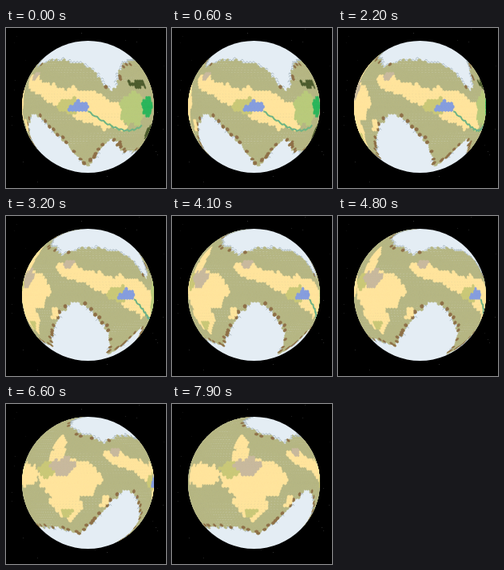
Animation of 200 by 200 pixels, one loop 8000 ms. Source, as an HTML page with a canvas:

```html
<!DOCTYPE html>
<html>
<head>
<meta charset="utf-8">
<style>
html, body { margin: 0; height: 100%; overflow: hidden; background: #000; }
canvas { display: block; width: 200px; height: 200px; }
</style>
</head>
<body>
<canvas id="stage" width="200" height="200"></canvas>
<script>
const ctx = document.getElementById('stage').getContext('2d');
const CX = 102.5, CY = 98.5, R = 82.5, RAD = Math.PI / 180;
const LOOP = 8000, STEP = 100, SPEED = 13.85; // degrees of longitude per second
const SEA = '#e4edf4', LAND = '#b5b684', SAND = '#ffe49c', BROWN = '#8f7048';
const ROCK = '#c8b99e', STEPPE = '#c9c878', MEADOW = '#b9ca7b';
const JUNGLE = '#2db55c', FOREST = '#4d5c2e', LAKE = '#869edd';

const hash = (a, b) => {
  const s = Math.sin(a * 127.1 + b * 311.7) * 43758.5453;
  return s - Math.floor(s);
};
const bump = (x, center, width) => Math.exp(-(((x - center) / width) ** 2));
const rough = (a, b) => Math.sin(a * .33 + b * .19) + Math.sin(a * .61 - b * .47 + 2) * .8;

// Coasts as latitudes over longitude: a base line with capes and bays
const northCoast = lon => 45 + 70 * bump(lon, -185, 48) - 8 * bump(lon, -72, 12)
  - 12 * bump(lon, 18, 30) - 20 * bump(lon, 22, 10);
const southCoast = lon => -42 + 36 * bump(lon, -54, 26) - 9 * bump(lon, -106, 14)
  - 22 * bump(lon, -3, 13) + 13 * bump(lon, 25, 10);

const isLand = (lon, lat) => {
  const y = lat + rough(lon, lat);
  return y < northCoast(lon) && y > southCoast(lon);
};

// A desert belt sloping across the continent, widest near the lake
const inBelt = (lon, lat) => lon > -74 && lon < 38 &&
  Math.abs(lat + .34 * lon) < 6 + 8 * bump(lon, 5, 30);

// Ovals: colour, centre longitude and latitude, half width and half height
const ovals = [
  [SAND, -110, 3, 30, 18],
  [SAND, -112, -18, 15, 16],
  [SAND, -123, 30, 8, 15],
  [SAND, -165, 7, 24, 10],
  [SAND, -75, -16, 5, 4],
  [STEPPE, -128, 12, 12, 7],
  [ROCK, -116, 14, 12, 8],
  [STEPPE, -113, -26, 6, 4],
  [ROCK, -62, 28, 5, 3],
  [STEPPE, -17, 1, 9, 7],
  [MEADOW, 46, -2, 17, 14],
  [JUNGLE, 66, 0, 12, 8],
  [FOREST, 55, 20, 16, 3],
  [FOREST, 80, -22, 8, 5],
  [LAKE, -8, 0, 8, 4.5]
];

function terrain(lon, lat) {
  const x = lon + 1.5 * rough(lat, lon), y = lat + 1.2 * rough(lon, lat);
  const oval = ovals.findLast(([, cx, cy, rx, ry]) => Math.hypot((x - cx) / rx, (y - cy) / ry) < 1);
  return oval ? oval[0] : inBelt(x, y) ? SAND : LAND;
}

// Hexagonal cells, each row of latitude shifted by half a cell
const D = 2.5, layers = new Map([[LAND, []]]), hatches = [];

function addCell(color, cell) {
  if (!layers.has(color)) layers.set(color, []);
  layers.get(color).push(cell);
}

function hexagon(lon, lat, w) {
  return Array.from({ length: 6 }, (_, i) => [
    lon + w * .62 * Math.sin(i * Math.PI / 3),
    lat + D * .74 * Math.cos(i * Math.PI / 3)
  ]);
}

for (let row = -34; row <= 34; row++) {
  const lat = row * D, w = D * 1.15 / Math.cos(lat * RAD);
  for (let col = 0; col * w < 294; col++) {
    const lon = -202 + (col + (row & 1) / 2) * w;
    const around = [[w, 0], [-w, 0], [0, D], [0, -D]].map(([x, y]) => isLand(lon + x, lat + y));
    const chance = hash(col, row);
    if (!isLand(lon, lat)) {
      if (around.includes(true) && chance < (lat > 0 ? .85 : .3)) hatches.push([lon, lat, w]);
      continue;
    }
    const cell = { lon, lat, corners: hexagon(lon, lat, w) };
    const color = terrain(lon, lat);
    addCell(LAND, cell);
    if (color !== LAND) addCell(color, cell);
    else if (around.includes(false) && chance < (lat > 0 ? .22 : .42)) addCell(BROWN, cell);
  }
}

const river = Array.from({ length: 30 }, (_, i) => {
  const lon = i * 2;
  return [lon, -4 - 17 * Math.sin(lon * Math.PI / 80) + .8 * Math.sin(lon)];
});

function project(lon, lat, turn) {
  const a = (lon + turn) * RAD, b = lat * RAD;
  return [CX + R * Math.sin(a) * Math.cos(b), CY - R * Math.sin(b), Math.cos(a) * Math.cos(b)];
}

function line(points, turn, color, width) {
  ctx.beginPath();
  points.map(p => project(...p, turn)).filter(p => p[2] > 0).forEach(p => ctx.lineTo(p[0], p[1]));
  ctx.strokeStyle = color;
  ctx.lineWidth = width;
  ctx.stroke();
}

function drawCells(color, cells, turn) {
  ctx.beginPath();
  for (const { lon, lat, corners } of cells) {
    if (project(lon, lat, turn)[2] < -.03) continue;
    corners.forEach((c, i) => {
      const [x, y] = project(...c, turn);
      ctx[i ? 'lineTo' : 'moveTo'](x, y);
    });
    ctx.closePath();
  }
  ctx.fillStyle = ctx.strokeStyle = color;
  ctx.lineWidth = .4;
  ctx.fill();
  ctx.stroke();
}

function draw(turn) {
  ctx.fillStyle = '#000';
  ctx.fillRect(0, 0, 200, 200);
  for (let i = 0; i < 45; i++) {
    ctx.fillStyle = `rgba(255,255,255,${.05 + .15 * hash(i, 3)})`;
    ctx.fillRect(Math.floor(hash(i, 1) * 200), Math.floor(hash(i, 2) * 200), 1, 1);
  }
  ctx.save();
  ctx.beginPath();
  ctx.arc(CX, CY, R, 0, 7);
  ctx.fillStyle = SEA;
  ctx.fill();
  ctx.clip();
  ctx.lineJoin = 'round';
  for (const [color, cells] of layers) drawCells(color, cells, turn);
  for (const [lon, lat, w] of hatches)
    line([[lon - w * .5, lat - .8], [lon, lat + 1], [lon + w * .5, lat - .4]], turn, '#a3b3bb', .8);
  line(river, turn, '#6fbf70', 2);
  line(river, turn, '#7095b8', .6);
  ctx.restore();
}

let last = -1;
function tick(now) {
  const step = Math.floor(now % LOOP / STEP);
  if (step !== last) draw(step * STEP / 1000 * SPEED);
  last = step;
  requestAnimationFrame(tick);
}
draw(0);
requestAnimationFrame(tick);
</script>
</body>
</html>
```
